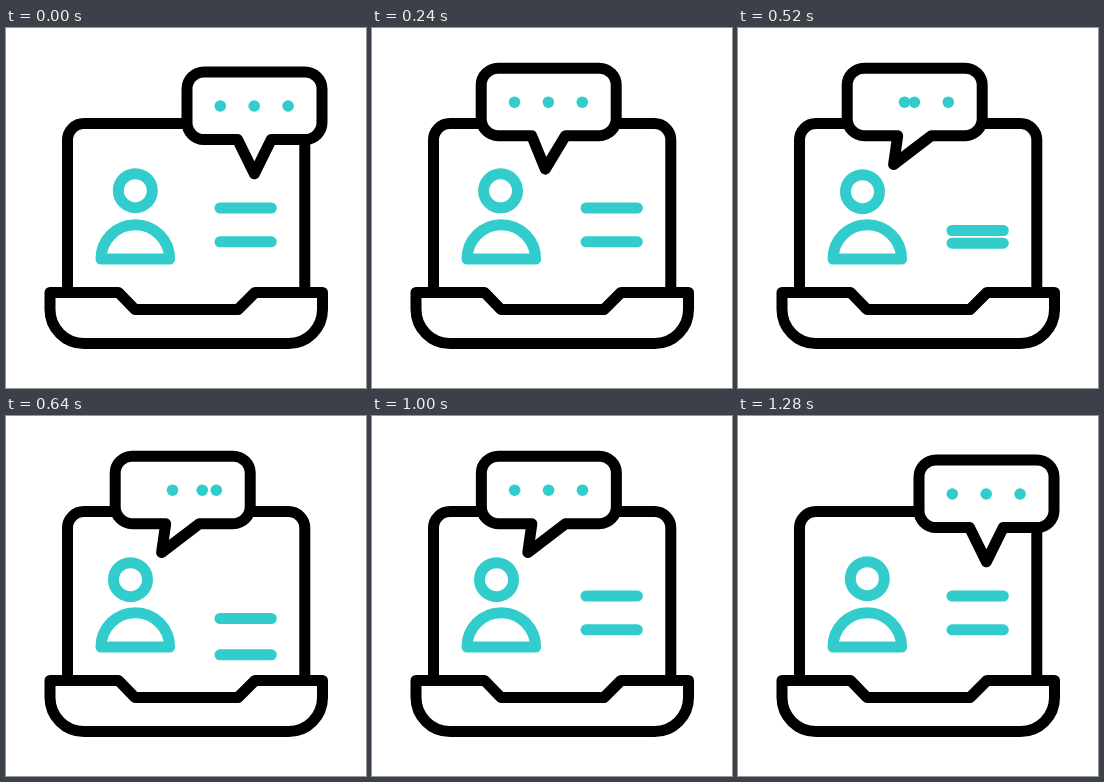
Recreate the animation shown at these times as an HTML page with a canvas. Size 360 by 360 pixels, loop 1480 ms.

```html
<!DOCTYPE html>
<html>
<head>
<meta charset="utf-8">
<style>
html, body { margin: 0; width: 100%; height: 100%; overflow: hidden; background: #fff; }
canvas { display: block; width: 360px; height: 360px; }
</style>
</head>
<body>
<canvas id="stage" width="360" height="360"></canvas>
<script>
const ctx = document.getElementById('stage').getContext('2d');
const BLACK = '#000', TEAL = '#33cccc';
const LOOP = 1480, TICK = 40;

// Eased 0..1 progress between two ticks
function ease(t, from, to) {
  const u = Math.min(1, Math.max(0, (t - from) / (to - from)));
  return u * u * (3 - 2 * u);
}

// Goes out during a..b and comes back during c..d
const swing = (t, a, b, c, d) => ease(t, a, b) - ease(t, c, d);

function outline(path, color, fill) {
  if (fill) {
    ctx.fillStyle = fill;
    ctx.fill(path);
  }
  ctx.strokeStyle = color;
  ctx.stroke(path);
}

const screen = new Path2D('M61.5 264.5V112A16.5 16.5 0 0 1 78 95.5H282.3A16.5 16.5 0 0 1 298.8 112V264.5');
const base = new Path2D('M44 264.5H112.5L129 281.5H232L249 264.5H316.5V281.5A34 34 0 0 1 282.5 315.5H78A34 34 0 0 1 44 281.5Z');
const shoulders = new Path2D('M95 231A34.3 34.3 0 0 1 163.6 231Z');

function dot(x, y, r) {
  const path = new Path2D();
  path.arc(x, y, r, 0, Math.PI * 2);
  return path;
}

function textLine(y) {
  outline(new Path2D(`M214 ${y}H265.3`), TEAL);
}

function drawBubble(shift, lean, dots) {
  ctx.save();
  ctx.translate(-71.8 * shift, -3.8 * shift);
  const tip = `${248.4 - 21 * lean} ${145.8 - 5.5 * lean}`;
  outline(new Path2D(
    `M198 44H299A17 17 0 0 1 316 61V94.5A17 17 0 0 1 299 111.5H265.3L${tip}L231.5 111.5` +
    'H198A17 17 0 0 1 181 94.5V61A17 17 0 0 1 198 44Z'), BLACK, '#fff');
  ctx.fillStyle = TEAL;
  dots.forEach((dx, i) => ctx.fill(dot(214.3 + 33.9 * i + dx, 78, 5.8)));
  ctx.restore();
}

function draw(t) {
  ctx.fillStyle = '#fff';
  ctx.fillRect(0, 0, 360, 360);
  ctx.lineWidth = 11;
  ctx.lineCap = ctx.lineJoin = 'round';

  const shift = swing(t, 2, 6, 24.8, 32);
  const lean = swing(t, 5, 9, 24.8, 32);

  outline(screen, BLACK);
  outline(base, BLACK, '#fff');
  outline(shoulders, TEAL);
  outline(dot(129.3 - 4.8 * lean, 162.7 + lean, 17), TEAL);
  textLine(180 + 22.5 * swing(t, 9, 13, 19.4, 23.4));
  textLine(213.8 + 25 * swing(t, 12.5, 16, 16, 19.5));
  drawBubble(shift, lean, [
    24 * swing(t, 9, 13, 21, 25),
    23.5 * swing(t, 13, 17, 17, 21),
    0
  ]);
}

const start = performance.now();
function frame() {
  draw(Math.floor(((performance.now() - start) % LOOP) / TICK));
  requestAnimationFrame(frame);
}
frame();
</script>
</body>
</html>
```
